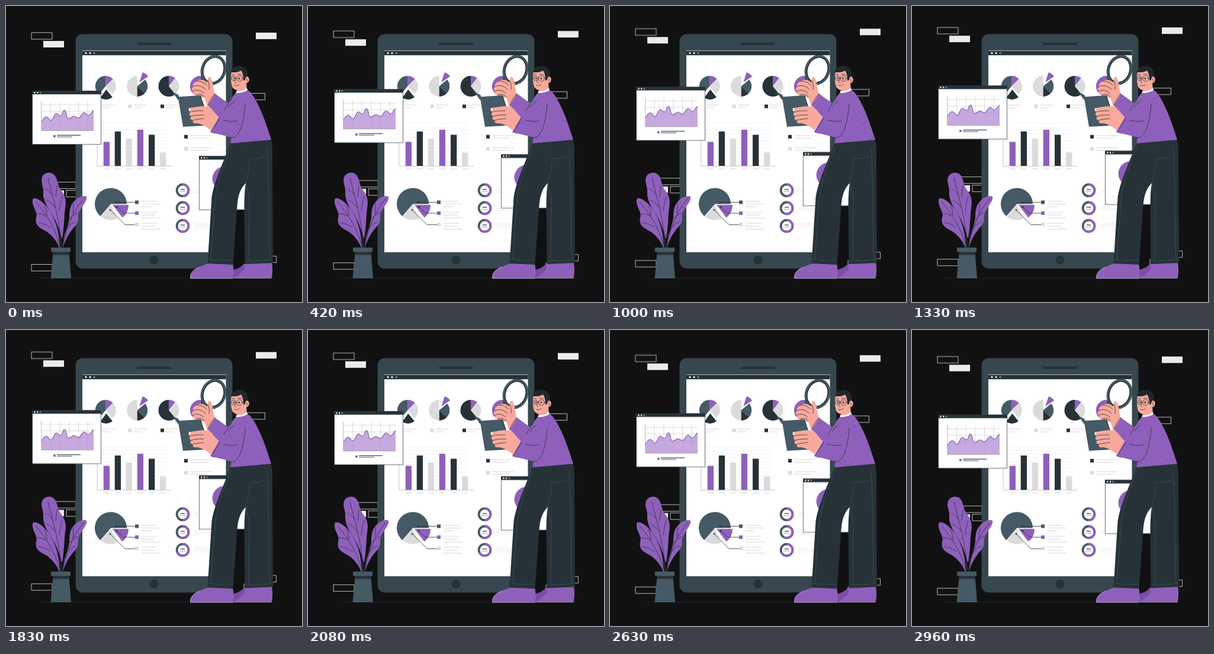
Animation, 500 px wide and 500 px high, one loop 3000 ms. Source, as an HTML page without scripts:

```html
<!DOCTYPE html>
<html lang="en">
<head>
<meta charset="utf-8">
<title>Data report</title>
<style>
html, body { margin: 0; width: 100%; height: 100%; overflow: hidden; background: #111; }
svg { display: block; width: 100vw; height: 100vh; }
.float { animation: float 3s linear infinite; }
@keyframes float { 50% { transform: translateY(-10px); } }
.p { fill: #8f60bb; }
.s { fill: #455a64; }
.d { fill: #263238; }
.g { fill: #dbdbdb; }
.w { fill: #fff; }
.e { fill: #ebebeb; }
.k { fill: #f8a99b; }
.line { fill: none; stroke: #263238; stroke-width: .8; stroke-linecap: round; stroke-linejoin: round; }
.soft { fill: none; stroke: #455a64; stroke-width: .8; stroke-linecap: round; }
.txt { fill: none; stroke: #e6e6e6; stroke-width: 1.7; }
.thin { fill: none; stroke: #dcdcdc; stroke-width: .6; }
.box { fill: none; stroke: #e4e4e4; stroke-width: .8; }
.slice { fill: none; stroke-width: 17.5; }
.ring { fill: none; stroke-width: 3.8; }
.sp { stroke: #8f60bb; }
.ss { stroke: #455a64; }
.sd { stroke: #263238; }
.sg { stroke: #dbdbdb; }
</style>
</head>
<body>
<svg viewBox="0 0 500 500">
<defs>
  <pattern id="knit" width="13" height="13" patternUnits="userSpaceOnUse" patternTransform="rotate(12)">
    <rect width="13" height="13" class="p"/>
    <circle cx="3" cy="3" r=".9" fill="#7a4da6"/>
    <circle cx="9.5" cy="9.5" r=".9" fill="#7a4da6"/>
  </pattern>
  <circle id="c" r="8.75" pathLength="360" transform="rotate(-90)"/>
  <circle id="o" r="9.9" pathLength="360" transform="rotate(-90)"/>
  <rect id="bar" width="35" height="11"/>
  <rect id="key" x="-3" y="-3" width="6" height="6"/>
  <path id="wave" d="M60 195C63 191 65 187 68 187C72 187 72 193.500 76 193.500C80 193.500 81 181.500 85 181.500C88 181.500 89 186 92 185.500C96 185 95 176 99 176C103 176 101 190.500 106 190.500C110 190.500 111 186 115 186C119 186 119 189.500 123 189C127 188 128 180 132 180C136 180 137 186 140 184.500C144 183 145 177 148 176"/>
  <g id="pane">
    <rect x=".3" y=".3" width="116" height="90.300" class="w" stroke="#263238" stroke-width=".7"/>
    <rect width="116.600" height="6" class="d"/>
    <circle cx="4.300" cy="3" r="1.200" class="w"/>
    <circle cx="9" cy="3" r="1.200" class="w"/>
    <circle cx="13.700" cy="3" r="1.200" fill="#8a969b"/>
  </g>
</defs>

<!-- loose bricks -->
<g class="float">
  <use href="#bar" x="43" y="45" class="box"/>
  <use href="#bar" x="63" y="59" class="e"/>
  <use href="#bar" x="422" y="45" class="e"/>
  <use href="#bar" x="402.5" y="147.5" class="box"/>
  <use href="#bar" x="83" y="297.5" class="box"/>
  <use href="#bar" x="63" y="311.5" class="e"/>
  <use href="#bar" x="102" y="311.5" class="box"/>
  <use href="#bar" x="43" y="436.5" class="box"/>
  <use href="#bar" x="421.5" y="422.5" class="box"/>
  <use href="#bar" x="402" y="437" class="box"/>
</g>
<path d="M58 459.7H452" stroke="#263238" stroke-width=".7"/>

<!-- tablet -->
<rect x="117.5" y="47.500" width="265" height="396" rx="12" fill="#37474f"/>
<rect x="221" y="61.500" width="58" height="4.600" rx="2" class="d"/>
<circle cx="250" cy="429.300" r="7.500" class="d"/>
<rect x="129" y="75.200" width="242.500" height="340.800" class="w"/>
<rect x="129" y="75.800" width="242.500" height="7.400" class="d"/>
<circle cx="135" cy="79.500" r="1.600" class="w"/>
<circle cx="142" cy="79.500" r="1.600" class="w"/>
<circle cx="149" cy="79.500" r="1.600" fill="#8a969b"/>

<!-- small pies -->
<g transform="translate(168.300 135.500)" class="slice">
  <use href="#c" class="sp" stroke-dasharray="45 315"/>
  <use href="#c" class="sg" stroke-dasharray="95 265" transform="rotate(45)"/>
  <use href="#c" class="ss" stroke-dasharray="140 220" transform="rotate(220)"/>
  <path d="M1 5.500L11.500 18.500A17 17 0 0 1-9 19.500Z" class="d"/>
</g>
<g transform="translate(221.700 135.500)" class="slice">
  <use href="#c" class="sg" stroke-dasharray="180 180" transform="rotate(180)"/>
  <use href="#c" class="ss" stroke-dasharray="85 275" transform="rotate(50)"/>
  <use href="#c" class="sd" stroke-dasharray="45 315" transform="rotate(135)"/>
  <path d="M3.500-6.500L9-23.500A18 18 0 0 1 18.500-16.500Z" class="p"/>
</g>
<g transform="translate(275 135.500)" class="slice">
  <use href="#c" class="sd" stroke-dasharray="220 140" transform="rotate(140)"/>
  <use href="#c" class="sp" stroke-dasharray="38 322"/>
  <use href="#c" class="sg" stroke-dasharray="102 258" transform="rotate(38)"/>
</g>
<g transform="translate(328.300 135.500)" class="slice">
  <use href="#c" class="ss" stroke-dasharray="180 180"/>
  <use href="#c" class="sp" stroke-dasharray="180 180" transform="rotate(180)"/>
</g>
<use href="#key" x="209.500" y="169.500" class="g"/>
<use href="#key" x="264" y="169.500" class="d"/>
<use href="#key" x="304" y="220.800" class="d"/>
<use href="#key" x="304" y="241.200" class="g"/>
<path class="txt" d="M162 167.300h22M162 172h14M216 167.300h21M216 172h14M270 167.300h21M270 172h14M311 219h37M311 223.300h30M311 239.300h37M311 243.600h30"/>

<!-- bar chart -->
<path class="thin" d="M161 198h111M161 204h111M161 210h111M161 216h111M161 222h111M161 228h111M161 234h111M161 240h111M161 246h111M161 252h111M161 258h111M161 264h111" opacity=".6"/>
<path d="M154 200V270.500H280" fill="none" stroke="#b4b4b4" stroke-width=".7"/>
<path class="p" d="M164.700 229.500h10.300v40.500h-10.300zM221.700 209h10.300v61h-10.300z"/>
<path class="d" d="M183.700 212h10.300v58h-10.300zM241 217.500h10.300v52.500h-10.300z"/>
<path class="g" d="M202.700 224h10.300v46h-10.300zM260 247.500h10.300v22.500h-10.300z"/>
<path d="M164.500 275.300h10.500m8.500 0h10.500m8.500 0h10.500m8.500 0h10.500m9 0h10.500m8.500 0h10.500" stroke="#cfcfcf" stroke-width=".9"/>

<!-- large pie -->
<path class="s" d="M177 334.500L159.500 355A27 27 0 1 1 204 334.500Z"/>
<path class="g" d="M176.500 335.500L188.500 359A27 27 0 0 1 160.500 356Z"/>
<path class="p" d="M180 336H207A27 27 0 0 1 196.500 357.500Z"/>
<path class="line" d="M186 331.500H218M187 339L198.500 350H218M176 344.500L201 369.500H218"/>
<path d="M186 331.500h0M187 339.500h0M176 344.500h0" stroke="#1a2226" stroke-width="2.600" stroke-linecap="round"/>
<use href="#key" x="221" y="331.500" class="s"/>
<use href="#key" x="221" y="350" class="p"/>
<use href="#key" x="221" y="369" class="g"/>
<path class="txt" d="M229 329.800h25M229 334.500h32M229 339.200h16M229 348.500h27M229 353.200h23M229 358h32M229 367h27M229 371.800h23M229 376.800h32"/>

<!-- rings -->
<g class="ring">
  <g transform="translate(298.500 311.300)"><use href="#o" class="ss"/><use href="#o" class="sp" stroke-dasharray="180 180"/></g>
  <g transform="translate(298.500 341.400)"><use href="#o" class="ss"/><use href="#o" class="sp" stroke-dasharray="215 145"/></g>
  <g transform="translate(298.500 371.500)"><use href="#o" class="ss"/><use href="#o" class="sp" stroke-dasharray="250 110"/></g>
</g>
<path d="M295 310h7M295 340h7M295 370h7" stroke="#455a64" stroke-width="1.500"/>
<path d="M293.500 313.500h10M293.500 343.500h10M293.500 373.500h10" stroke="#a8a8a8" stroke-width="1"/>
<path class="thin" d="M317 308h28M317 311.500h28M317 315h28M317 338h28M317 341.500h28M317 345h28M317 368.300h28M317 371.500h28M317 374.800h28"/>

<!-- left window -->
<g class="float">
  <use href="#pane" x="44.200" y="143.200"/>
  <path d="M60 167h88M60 178h88M60 189h88M75.500 162V210M91 162V210M107 162V210M122.500 162V210M138 162V210" stroke="#263238" stroke-width=".5" opacity=".35"/>
  <path d="M60 210.500V195L148 176V210.500Z" fill="none"/>
  <use href="#wave" fill="#b898d4" fill-opacity="0"/>
  <path fill="#b793d6" fill-opacity=".78" d="M60 210.500V195C63 191 65 187 68 187C72 187 72 193.500 76 193.500C80 193.500 81 181.500 85 181.500C88 181.500 89 186 92 185.500C96 185 95 176 99 176C103 176 101 190.500 106 190.500C110 190.500 111 186 115 186C119 186 119 189.500 123 189C127 188 128 180 132 180C136 180 137 186 140 184.500C144 183 145 177 148 176V210.500Z"/>
  <use href="#wave" fill="none" stroke="#8050ae" stroke-width="1.100"/>
  <path d="M59.600 161V210.500H148" fill="none" stroke="#8a8a8a" stroke-width=".6"/>
  <rect x="80" y="218" width="3.800" height="3.800" class="p"/>
  <path d="M86 218.300h40M86 221h26" stroke="#37474f" stroke-width="1.200"/>
</g>

<!-- right window -->
<g class="float">
  <use href="#pane" x="326" y="253.500"/>
  <circle cx="369.500" cy="292" r="21" class="p"/>
</g>

<!-- shoes and trousers -->
<path class="p" d="M383 459.500V446C392 444 398 440 403 435L449 433C451 445 450 455 448.500 459.500Z"/>
<path d="M384 459.500V446C392 444 398 440 403 437V445C397 451 391 456 384 459.500Z" fill="#7a4da6"/>
<path class="p" d="M311 460C311 446 324 441 342 435H383C385 446 385 454 384 460Z"/>
<path d="M311.500 460C311 450 318 445 327 441M311.500 460.300H384M385 459.700H448.500" fill="none" stroke="#e6dcef" stroke-width=".6"/>
<path class="d" d="M380 230L447 225C451 234 450 246 450 260L451 434L403.500 436L402.500 345C402.500 325 403 312 405 299C395 309 391.500 322 390.500 338L383.500 437L340.500 435L347.500 323C352 294 369 260 380 230Z"/>
<path class="soft" d="M437 254C428 257 419 258 411 258.500M412 263C411 275 408 288 405 299M381 237C368 265 356 300 353 330L346 428M441 240C445 290 443 380 446 428M343 428C356 430 370 430 382 429M405 430C420 431 436 430 449 428M405 299L411 325L410 428" opacity=".8"/>

<!-- magnifier -->
<path d="M333 122L328 153" stroke="#263238" stroke-width="5" stroke-linecap="round"/>
<g transform="rotate(19 350.500 108)">
  <ellipse cx="350.500" cy="108" rx="18.800" ry="23.300" fill="#fff" fill-opacity=".9" stroke="#263238" stroke-width="5"/>
  <ellipse cx="350.500" cy="108" rx="19.500" ry="24" fill="none" stroke="#455a64" stroke-width="3"/>
</g>

<!-- far arm -->
<path class="k" d="M353 149C350 141 350 129 346 121C343 118 340 121 341 126L339 129C335 124 327 123 323 127C315 130 315 134 317 136C313 139 313 142 316 144C314 148 318 151 322 150C324 155 331 156 335 155L340 170L354 159Z"/>
<path class="line" d="M323 127C329 126 335 130 339 134M317 136C324 132 332 136 337 141M316 144C322 140 329 143 334 147M322 150C327 148 331 150 335 153M341 126C343 131 344 136 343 141"/>
<path class="p" d="M353 148L375 164L390 150V200L362 191L341 168Z"/>
<path class="line" d="M353 148C347 154 344 160 341 168M376 164L368 177"/>

<!-- torso -->
<path d="M388 147C395 142 403 142 410 143C417 148 432 172 448 226L379.500 232C380 226 380 224 382 221C371 216 359 213 347 211L362 188L378 192C378 175 374 162 388 147Z" fill="url(#knit)"/>
<path class="line" d="M404 165C403 183 399 205 393 214C388 222 384 223 379 222M362 191C373 195 383 196 391 194M376 171C379 166 382 163 386 161"/>

<!-- clipboard -->
<path d="M281 145L291 150L296 161L290 158Z" class="s"/>
<path class="s" d="M290.500 153.500L327 151L333 170L337 202L299 204Z"/>
<path class="d" d="M327 151L329 151.500L335 170L338.500 202L337 202L333 170Z"/>
<circle cx="311.500" cy="175" r="3" class="w"/>

<!-- near hand -->
<path class="k" d="M361 190C353 183 350 174 342 170C334 168 321 170 313 172C309 174 310 178 314 178C308 180 309 186 314 186C309 189 312 193 316 193C314 198 319 199 323 198C331 200 336 202 346 210Z"/>
<path class="line" d="M314 178C321 177 328 177 333 177M314 186C321 184 328 184 334 184M316 193C322 191 328 191 334 190"/>
<path class="p" d="M360 187L368 191L353 216L345 213Z"/>
<path class="p" d="M345 213L358 200L385 205L381 222Z"/>
<path class="line" d="M361 189C356 199 351 206 346 212"/>

<!-- head -->
<path class="k" d="M391 136L406 130L407 142C401 146 395 146 390 144Z"/>
<path class="w" d="M389 143.500C396 145 402 142.500 406.500 138.500L408.500 142C402 146 395 147 388.500 147Z"/>
<path class="k" d="M381 111C379 120 380 131 382 136C385 143 394 144 399 139L404 131C411 131 413 122 408 119L404 106Z"/>
<path fill="#20282c" d="M379.800 112C381 104 388 100.800 396 101.300C406 102 410 111 408.500 120C406 118 404 121 404 125L401 126C401 119 400 113 397 109C391 113 385 112 379.800 112Z"/>
<g class="line">
  <circle cx="394.500" cy="122.500" r="4.800"/>
  <circle cx="384.300" cy="122" r="3.700"/>
  <path d="M399.300 122L405 121M388 121.500H389.700M388 124C386 128 386 129 388.500 129.500M386 134C389 135.500 392 134.500 394 132.500M391 115.500C394 114.500 396 115 398 116.500M382 116L386 115.500M406 123C408 123 408.500 126 406.500 128"/>
</g>
<circle cx="393.800" cy="122.500" r="1.400" class="d"/>
<circle cx="385" cy="122" r="1.300" class="d"/>

<!-- plant -->
<path class="line" style="stroke-width:1.600" d="M93 408L91 375M91 408L86 390M96 408L99 385"/>
<path class="p" d="M90 408C85 396 79 389 70 382C60 376 51 373 50.500 363C50 358 53 355 51 349C48 341 43 333 45.500 326C48 322 60 328 68 338C80 352 90 375 91 408Z"/>
<path class="p" d="M96 408C97 388 105 372 107 358C107 346 108 336 116 329C122 322 133 319 136 322.500C138 329 127 340 123 349C120 356 124 361 119 369C113 377 104 384 96 408Z"/>
<path class="p" d="M94 392C88 370 82 358 74 346C66 334 62 323 63 312C63 304 58 297 61 289C64 281 77 278 83 287C88 295 86 302 93 311C101 321 102 330 100 341C98 356 99 368 95 392Z"/>
<path class="line" d="M71 290C77 318 89 350 94 405M67 309C72 312 75 315 78 319M69 328C75 331 79 335 84 341M86 304C85 311 85 315 84 322M95 322C92 332 91 338 90 346M50 331C67 350 83 375 91 405M53 351C59 351 63 352 67 355M55 366C63 367 69 370 75 374M65 337C67 342 69 346 69 354M131 326C114 346 103 370 96 405M114 333C114 339 114 343 113 350M121 349C116 351 112 354 109 359M117 365C111 367 107 370 103 376"/>
<path class="s" d="M79.500 417H106.500L110 460H75.500Z"/>
<path class="d" d="M79.800 415H106.200L106.600 420.500H79.400Z"/>
<rect x="76" y="408" width="33" height="7.600" class="s"/>
</svg>
</body>
</html>
```
